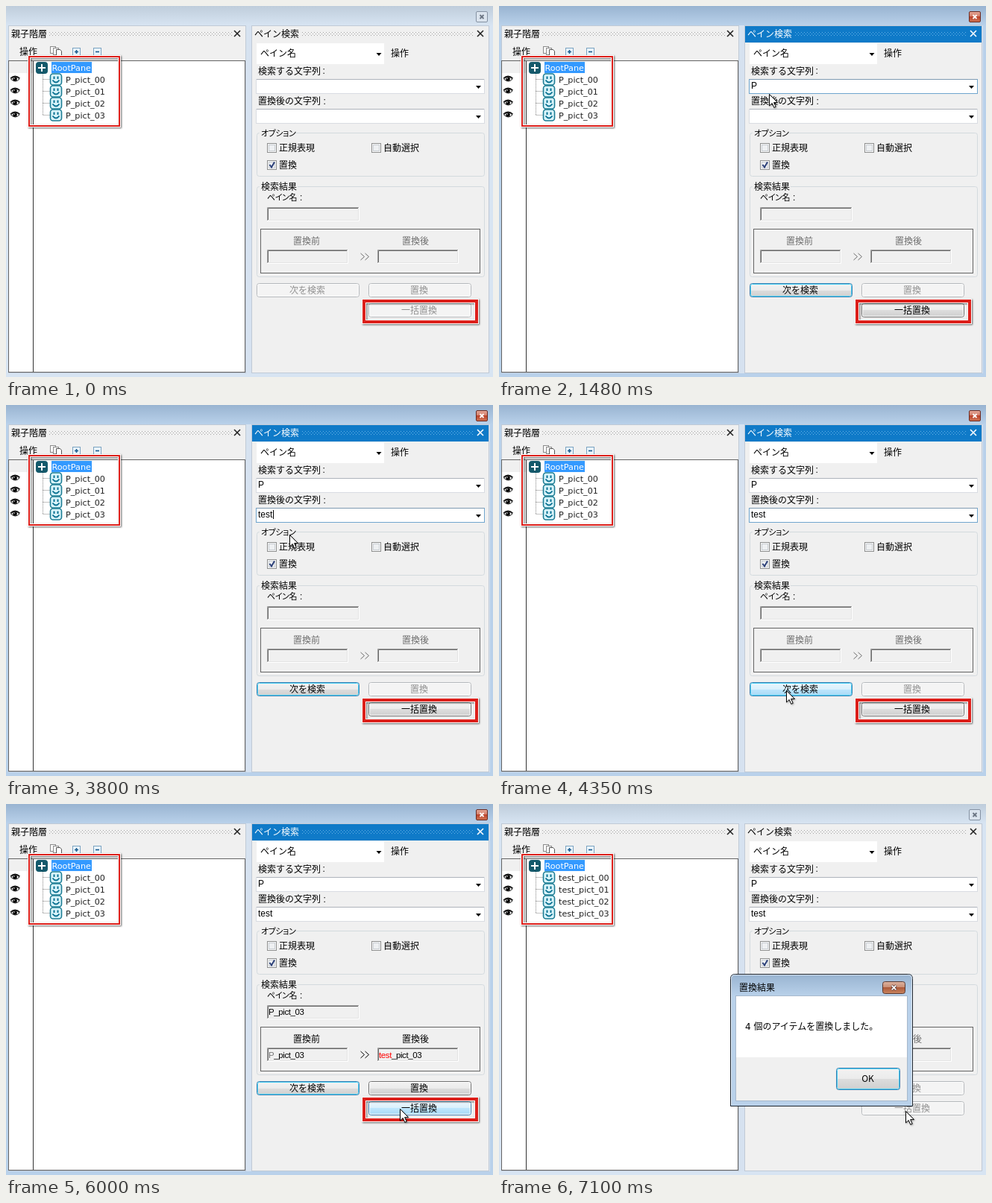
Animation of 653 by 498 pixels, one loop 8000 ms. Source, as an HTML page:

```html
<!DOCTYPE html>
<html lang="ja">
<head>
<meta charset="utf-8">
<title>ペイン検索</title>
<style>
html, body { margin: 0; width: 100%; height: 100%; overflow: hidden; background: #d7e4f2; }
svg { display: block; width: 653px; height: 498px; }
text { font: 12px "Noto Sans CJK JP", "Noto Sans CJK", sans-serif; fill: #000; white-space: pre; }
.kana { font-size: 11px; font-feature-settings: "palt"; letter-spacing: -.4px; }
.lat { font: 12px "Liberation Sans", sans-serif; }
.res { font: 11.5px "Liberation Sans", sans-serif; letter-spacing: -.4px; }
.tree { font: 11.2px "DejaVu Sans", sans-serif; fill: #222; }
.num { font-family: "DejaVu Sans", sans-serif; }
.mid { text-anchor: middle; }
.hide { display: none; }

.frame { fill: #d7e4f2; }
.active .frame { fill: #b9d1ea; }
.bar { fill: url(#barOff); }
.active .bar { fill: url(#barOn); }
.cap { fill: #f0f0f0; }
.active .cap { fill: #0f7ac8; }
.active .capText { fill: #fff; }
.capX { stroke: #222; }
.active .capX { stroke: #fff; }
.capDots { fill: url(#dots); }
.active .capDots { fill: url(#dotsOn); }
.close rect { fill: #dbe4ee; stroke: #8592a3; }
.close path { stroke: #6b7583; }
.active .close rect { fill: url(#red); stroke: #6b2b22; }
.active .close path { stroke: #fff; }

.combo { fill: #fff; stroke: #d9dce2; }
.combo.focus { stroke: #6fa5ce; }
.dim { fill: #6d6d6d; }
.found .dim { fill: #000; }
.found .chev { stroke: #000; }
.chev { stroke: #6d6d6d; fill: none; }

.btn rect { fill: #f4f4f4; stroke: #b4b8bb; }
.btn .in { fill: none; stroke: #fcfcfc; }
.btn text { fill: #909090; }
.btn.on .box { fill: url(#norm); stroke: #707070; }
.btn.on text { fill: #000; }
.btn.focus .box { stroke: #3c7fb1; }
.btn.focus .in { stroke: #48d0f4; }
.btn.hover .box { fill: url(#hov); stroke: #3c7fb1; }
.btn.down .box { fill: url(#down); stroke: #2c628b; }
.btn.down .in { stroke: #8fb9cf; }
.mark { fill: none; filter: drop-shadow(1px 1px 1px #0009); }
</style>
</head>
<body>
<svg id="stage" viewBox="0 0 653 498" xmlns="http://www.w3.org/2000/svg"></svg>
<script>
const stage = document.getElementById('stage');
const $ = id => document.getElementById(id);

const rect = (x, y, w, h, attrs = '') =>
  `<rect x="${x}" y="${y}" width="${w}" height="${h}" ${attrs}/>`;
const text = (x, y, s, cls = '', attrs = '') =>
  `<text x="${x}" y="${y}" class="${cls}" ${attrs}>${s}</text>`;
const path = (d, attrs) => `<path d="${d}" ${attrs}/>`;
const grad = (id, a, b, c, d) => `<linearGradient id="${id}" x2="0" y2="1">
  <stop stop-color="${a}"/><stop offset=".5" stop-color="${b}"/>
  <stop offset=".5" stop-color="${c}"/><stop offset="1" stop-color="${d}"/></linearGradient>`;
const fade = (id, a, b) => `<linearGradient id="${id}" x2="0" y2="1">
  <stop stop-color="${a}"/><stop offset="1" stop-color="${b}"/></linearGradient>`;
const dots = (id, color) =>
  `<pattern id="${id}" x="1" y="35" width="4" height="4" patternUnits="userSpaceOnUse">
  <path d="M0 0h1v1H0zM2 2h1v1H2z" fill="${color}"/></pattern>`;
const cross = (x, y, r, attrs) =>
  path(`M${x - r} ${y - r}l${2 * r} ${2 * r}m0 ${-2 * r}l${-2 * r} ${2 * r}`, attrs);
const down = (x, y) => path(`M${x - 3.5} ${y - 2}h7l-3.5 4z`, 'fill="#000"');

const defs = () => `<defs>
  ${grad('norm', '#f3f3f3', '#ebebeb', '#dddddd', '#cfcfcf')}
  ${grad('hov', '#eaf6fd', '#d9f0fc', '#bee6fd', '#a7d9f5')}
  ${grad('down', '#e0f1fa', '#c4e5f6', '#98d1ef', '#68b3db')}
  ${grad('red', '#e3a798', '#d37b66', '#bd432b', '#cf7555')}
  ${grad('rust', '#dcb3a0', '#c98c72', '#ad5a3a', '#c98560')}
  ${fade('barOff', '#bfcddb', '#d7e4f2')}${fade('barOn', '#99b4d1', '#b9d1ea')}
  ${dots('dots', '#a4a4a4')}${dots('dotsOn', '#63b0e6')}</defs>`;

const eye = y => path(`M6.5 ${y}q5.5 -6 11.5 0q-5.5 6 -11.5 0z`, 'fill="#fff" stroke="#111"')
  + `<circle cx="12" cy="${y}" r="2.8"/><circle cx="11" cy="${y - 1}" r=".8" fill="#fff"/>`
  + path(`M6 ${y - 1}q6 -5.5 12.5 0`, 'fill="none" stroke="#111" stroke-width="1.3"');

const face = y => rect(59.5, y - 7.5, 15, 15, 'rx="3.5" fill="#d9f4fb" stroke="#1c7d94" stroke-width="1.6"')
  + path(`M64.5 ${y - 4}v3.5M69.5 ${y - 4}v3.5M62.5 ${y + 1}q4.5 6 9 0`,
    'fill="none" stroke="#0c7393" stroke-width="2"');

const node = i => {
  const y = 98.5 + 16 * i;
  return path(`M49.5 ${y}h9`, 'stroke="#888" stroke-dasharray="1 1"')
    + eye(y - .5) + face(y) + text(80, y + 4.5, '', 'tree', `id="n${i}"`);
};

const tool = (x, plus) => rect(x - 4.5, 56.5, 10, 10, 'fill="#eaf4fb" stroke="#7ba3c1"')
  + path(`M${x - 2} 61.5h5` + (plus ? `M${x + .5} 59v5` : ''), 'stroke="#16598c" stroke-width="1.6"');

const mark = (id, x, y, w, h, line) => `<g class="mark" id="${id}">
  ${rect(x, y, w, h, `stroke="#fff" stroke-width="${line + 2}"`)}
  ${rect(x, y, w, h, `stroke="#dc1f1a" stroke-width="${line}"`)}</g>`;

const leftPanel = () => rect(3.5, 26.5, 318, 466, 'fill="#f0f0f0" stroke="#c0cad6"')
  + text(7, 41.5, '親子階層')
  + `<g transform="translate(1 0)">${rect(57, 35, 246, 5, 'fill="url(#dots)"')}</g>`
  + cross(310, 37, 4, 'stroke="#222" stroke-width="1.6"')
  + text(18, 66, '操作')
  + rect(59.5, 54.5, 7, 9, 'fill="#fff" stroke="#8a8a8a"') + rect(63.5, 56.5, 7, 9, 'fill="#fff" stroke="#8a8a8a"')
  + path('M67.5 58.5h5l2 2v6h-7z', 'fill="#fff" stroke="#555"')
  + tool(94, true) + tool(122, false)
  + rect(3.5, 73.5, 317, 418, 'fill="#fff" stroke="#646464"') + rect(4, 74, 32, 16, 'fill="#f0f0f0"')
  + path('M36.5 74V491', 'stroke="#333"')
  + path('M49.5 91V147', 'stroke="#888" stroke-dasharray="1 1"')
  + rect(40, 75, 16, 16, 'rx="4" fill="#14596b"') + path('M43 83h10M48 78v10', 'stroke="#fff" stroke-width="2"')
  + rect(61, 75, 54, 15, 'fill="#3399ff"') + text(61.5, 87, 'RootPane', 'tree', 'style="fill:#fff"')
  + [0, 1, 2, 3].map(node).join('') + mark('treeMark', 31, 68, 121, 93, 2);

const combo = (id, y) => rect(335.5, y + .5, 306, 19, `class="combo" id="${id}Box"`)
  + path(`M336 ${y + .5}H641`, 'stroke="#8d939b" stroke-opacity=".55"')
  + down(633.5, y + 11) + text(338, y + 13, '', 'lat', `id="${id}"`);

const group = (y, h, label, w, cls) => rect(336.5, y + .5, 305, h, 'rx="3" fill="none" stroke="#d3dade"')
  + rect(340, y - 4, w, 10, 'fill="#f0f0f0"') + text(342, y + 4.5, label, cls);

const check = (x, y, label, on) => rect(x + .5, y + .5, 12, 12, 'fill="#f8f8f8" stroke="#8e8f8f"')
  + rect(x + 2.5, y + 2.5, 8, 8, 'fill="#eef0f2" stroke="#c9ced3"')
  + (on ? path(`M${x + 3.5} ${y + 6}l2.5 3.5l4 -7`, 'fill="none" stroke="#2b3f78" stroke-width="2"') : '')
  + text(x + 16, y + 11, label);

const sunken = (x, y, w) => path(`M${x + .5} ${y + 19}V${y + .5}H${x + w}`, 'fill="none" stroke="#a0a0a0"')
  + path(`M${x + 1.5} ${y + 18}V${y + 1.5}H${x + w - 1}`, 'fill="none" stroke="#696969"')
  + path(`M${x + 1} ${y + 17.5}H${x + w - 1.5}V${y + 1}`, 'fill="none" stroke="#e3e3e3"')
  + path(`M${x} ${y + 18.5}H${x + w - .5}V${y}`, 'fill="none" stroke="#fff"');

const button = (id, x, y, label) => `<g class="btn" id="${id}">
  ${rect(x + .5, y + .5, 137, 18, 'rx="3" class="box"')}${rect(x + 1.5, y + 1.5, 135, 16, 'rx="2" class="in"')}
  ${text(x + 68, y + 13.5, label, 'mid')}</g>`;

const rightPanel = () => rect(329.5, 26.5, 318, 466, 'fill="#f0f0f0" stroke="#c0cad6"')
  + rect(330, 27, 317, 22, 'class="cap"') + text(333, 41.5, 'ペイン検索', 'capText')
  + rect(397, 35, 229, 5, 'class="capDots"') + cross(636, 37, 4, 'class="capX" stroke-width="1.6"')
  + rect(336, 50, 171, 28, 'fill="#fff"') + text(341, 68, 'ペイン名') + down(500, 65) + text(516, 68, '操作')
  + text(338, 91.5, '検索する文字列') + text(424.5, 91, ':', 'lat') + combo('find', 98)
  + text(338, 132, '置換後の文字列') + text(425.5, 131.5, ':', 'lat') + combo('repl', 138)
  + group(170, 58, 'オプション', 47, 'kana') + check(350, 184, '正規表現') + check(490, 184, '自動選択')
  + check(350, 207, '置換', true)
  + group(242, 121, '検索結果', 51, '')
  + text(350, 261, 'ペイン名', 'kana') + text(394, 260.5, ':', 'lat') + sunken(350, 270, 124)
  + rect(341.5, 299.5, 294, 59, 'fill="none" stroke="#646464"')
  + text(385, 319.5, '置換前', 'dim') + text(531, 319.5, '置換後', 'dim')
  + sunken(350, 327, 109) + sunken(498, 327, 109)
  + path('M475.5 332l5 4.5l-5 4.5M481.5 332l5 4.5l-5 4.5', 'class="chev"')
  + `<g id="result">${text(352, 283, 'P_pict_03', 'res')}
    ${text(352, 340.5, '<tspan fill="#777">P</tspan>_pict_03', 'res')}
    ${text(500, 340.5, '<tspan fill="#f00">test</tspan>_pict_03', 'res')}</g>`
  + button('next', 336, 372, '次を検索') + button('one', 486, 372, '置換') + button('all', 486, 399, '一括置換')
  + mark('mark', 480, 396, 151, 28, 4);

const dialog = () => `<g id="dialog">
  ${path('M310.5 405.5V234.5q0 -6 6 -6H548.5q6 0 6 6V405.5Z', 'fill="#b9d1ea" stroke="#1e2630"')}
  ${path('M311 258V234.5q0 -5.5 5.5 -5.5H548.5q5.5 0 5.5 5.5V258Z', 'fill="url(#barOn)"')}
  ${path('M311.5 404V234.5q0 -5 5 -5H548.5q5 0 5 5V404', 'fill="none" stroke="#fff" stroke-opacity=".6"')}
  ${text(322, 250.5, '置換結果')}
  ${rect(514.5, 238.5, 30, 16, 'rx="3" fill="url(#rust)" stroke="#5a3a33"')}
  ${cross(529.5, 246.5, 3, 'stroke="#5b3a38" stroke-width="3.2"')}
  ${cross(529.5, 246.5, 2.8, 'stroke="#fff" stroke-width="1.8"')}
  ${rect(317.5, 257.5, 230, 141, 'fill="#f0f0f0" stroke="#a7b9cc"')}
  ${rect(318, 258, 229, 82, 'fill="#fff"')}
  ${text(330, 303, '<tspan class="num">4 </tspan>個のアイテムを置換しました。')}
  ${rect(452.5, 354.5, 85, 29, 'rx="3" fill="url(#norm)" stroke="#3c7fb1"')}
  ${rect(453.5, 355.5, 83, 27, 'rx="2" fill="none" stroke="#48d0f4"')}
  ${text(494.5, 373, 'OK', 'mid')}</g>`;

const pointers = () => `<g id="pointer">
  ${path('M.5 .5V16L4.2 12.5L6.8 18.4L9.2 17.3L6.6 11.6H11.5Z',
    'id="arrow" fill="#fff" stroke="#000" style="filter:drop-shadow(1px 1px 1px #0005)"')}
  ${path('M-3 -7.5h2.5l1 1l1 -1h2.5M-3 7.5h2.5l1 -1l1 1h2.5M.5 -6.5v13', 'id="beam" fill="none" stroke="#000"')}</g>`;

stage.innerHTML = defs() + rect(0, 0, 653, 498, 'class="frame"') + rect(0, 0, 653, 26, 'class="bar"')
  + rect(3, 26, 646, 467, 'fill="#d6e2f0"')
  + `<g class="close">${rect(630.5, 7.5, 15, 14, 'rx="1.5"')}${cross(638, 14.5, 2.5, 'stroke-width="1.8"')}</g>`
  + leftPanel() + rightPanel() + path('', 'id="caret" stroke="#000"') + dialog() + pointers();

const LOOP = 8000, STEP = 80;
const typed = [[0, ''], [1870, 't'], [2020, 'te'], [2560, 'tes'], [2790, 'test']];
const carets = [[0, 0], [550, 345], [1090, 0], [1640, 338], [1870, 342], [2020, 348], [2560, 354],
  [2790, 358], [3260, 0], [3790, 358], [4300, 0]];
// start, end, from x, from y, to x, to y; a bare start hides the pointer
const moves = [[0], [70, 310, 470, 230, 355, 106], [550], [1400, 1640, 356, 108, 380, 148], [1870],
  [3720, 4120, 380, 148, 384, 397], [4300, 4300, 385, 383, 385, 383],
  [5440, 6160, 410, 393, 545, 411], [7020, 7020, 545, 412, 545, 412]];

const latest = (list, t) => list.filter(e => e[0] <= t).pop();
const show = (id, on) => $(id).classList.toggle('hide', !on);
const within = (t, a, b) => t >= a && t < b;

function pointerAt(t) {
  const [a, b, x0, y0, x1, y1] = latest(moves, t);
  if (b === undefined) return null;
  const p = b > a ? Math.min(1, Math.floor((t - a) / STEP) * STEP / (b - a)) : 1;
  const e = p * p * (3 - 2 * p);
  return [Math.round(x0 + (x1 - x0) * e), Math.round(y0 + (y1 - y0) * e)];
}

function look(id, on, focus, hover, pressed) {
  $(id).setAttribute('class', 'btn' + (on ? ' on' : '') + (focus ? ' focus' : '')
    + (hover ? ' hover' : '') + (pressed ? ' down' : ''));
}

function render(t) {
  const found = within(t, 4820, 7100), ready = within(t, 550, 7100);
  stage.classList.toggle('active', within(t, 310, 7020));
  stage.classList.toggle('found', found);
  $('find').textContent = t >= 550 ? 'P' : '';
  $('repl').textContent = latest(typed, t)[1];
  $('findBox').classList.toggle('focus', within(t, 310, 1640));
  $('replBox').classList.toggle('focus', within(t, 1640, 4660));

  const cx = latest(carets, t)[1], cy = t < 1640 ? 101 : 141;
  $('caret').setAttribute('d', cx ? `M${cx + .5} ${cy}v12` : '');

  const pos = pointerAt(t);
  const [x, y] = pos || [0, 0];
  const over = (left, top) => within(x, left, left + 138) && within(y, top, top + 19);
  show('pointer', pos);
  if (pos) {
    const inField = within(y, 98, 118) || within(y, 138, 158);
    $('pointer').setAttribute('transform', `translate(${x} ${y})`);
    show('beam', inField);
    show('arrow', !inField);
  }

  look('next', ready, within(t, 550, 6860), ready && over(336, 372), within(t, 4660, 4820));
  look('one', found);
  look('all', ready, within(t, 6860, 7100), ready && over(486, 399), within(t, 6860, 7020));
  show('result', found);
  show('mark', t < 7100);
  show('dialog', t >= 7100);
  for (let i = 0; i < 4; i++) $('n' + i).textContent = (t < 7020 ? 'P' : 'test') + '_pict_0' + i;
}

const start = performance.now();
function tick() {
  render((performance.now() - start) % LOOP);
  requestAnimationFrame(tick);
}
tick();
</script>
</body>
</html>
```
